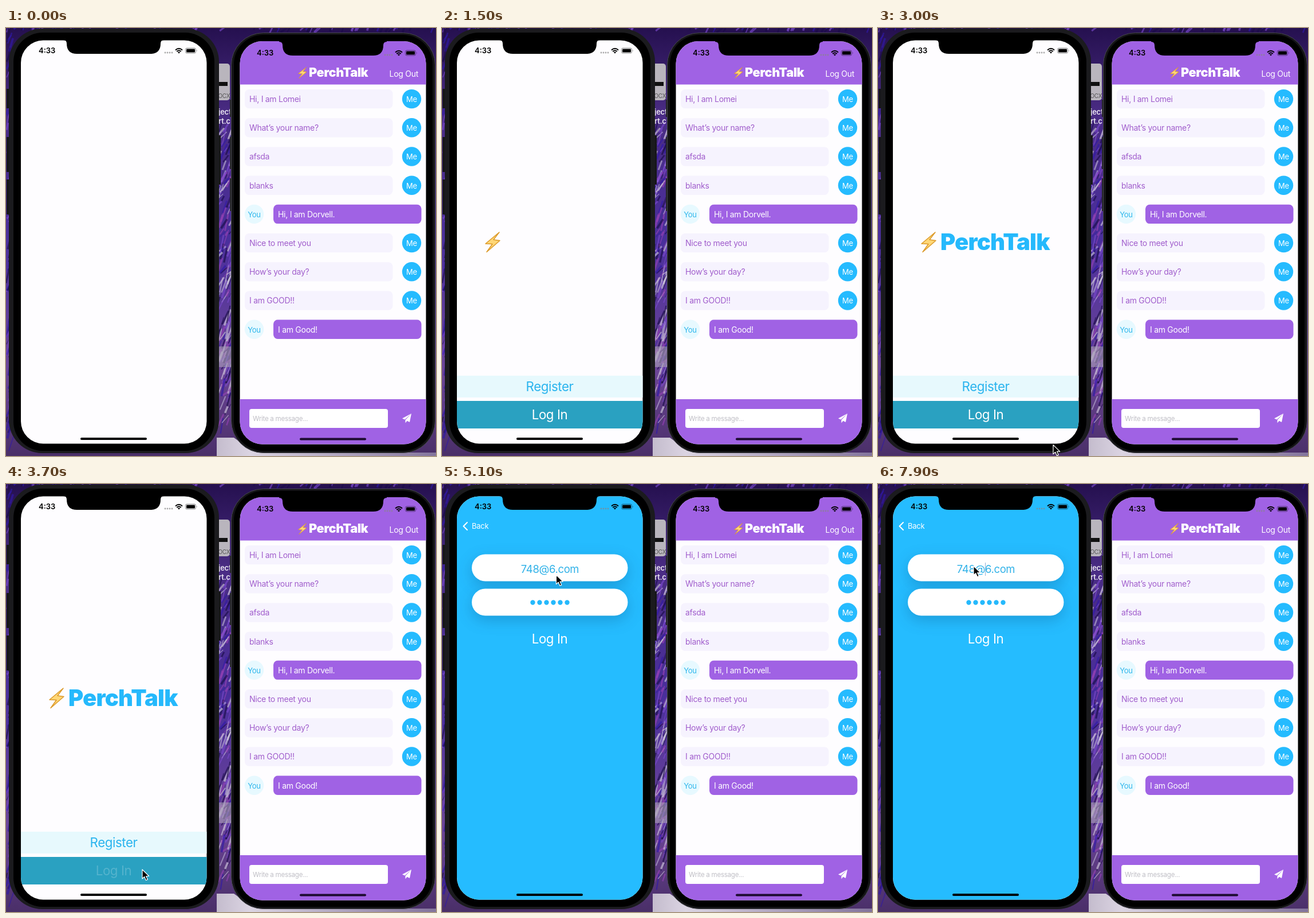
An HTML page for the animation above (8 s loop, 751x746 px).

```html
<!DOCTYPE html>
<html lang="en">
<head>
<meta charset="utf-8">
<title>Chat app login</title>
<style>
  html, body { margin: 0; width: 100%; height: 100%; overflow: hidden; background: #24104f; }
  svg { display: block; width: 751px; height: 746px; }
  text { font-family: Inter, Roboto, "Liberation Sans", sans-serif; letter-spacing: -.02em; white-space: pre; }
  .mid { text-anchor: middle; }
  .time { font-size: 13px; font-weight: 600; letter-spacing: 0; }
  .msg { font-size: 14px; }
  .name { font-weight: 900; }
  .big { font-size: 22.3px; text-anchor: middle; }
  .field { fill: #fff; filter: drop-shadow(0 8px 13px rgba(0, 40, 80, .22)); }
</style>
</head>
<body>
<svg viewBox="0 0 751 746">
  <defs>
    <linearGradient id="wall" x2="0" y2="1">
      <stop offset="0" stop-color="#25104f"/>
      <stop offset=".2" stop-color="#4a2c84"/>
      <stop offset=".5" stop-color="#4a2f9c"/>
      <stop offset=".8" stop-color="#6c4598"/>
      <stop offset="1" stop-color="#4a2f68"/>
    </linearGradient>
    <linearGradient id="glow">
      <stop offset="0" stop-color="#c4bccd"/>
      <stop offset=".15" stop-color="#dbd4e2"/>
      <stop offset="1" stop-color="#83749c"/>
    </linearGradient>
    <clipPath id="leftClip"><rect x="26" y="21.500" width="324.500" height="703" rx="39"/></clipPath>
    <clipPath id="rightClip"><rect x="408.500" y="23" width="325" height="702.500" rx="39"/></clipPath>
    <path id="bolt" d="M100 356L76 376 88 376.500 78 390.500 101 370.500 90 369Z" fill="#ffd777" stroke="#dc9a2a" stroke-width="1.500" stroke-linejoin="round"/>
    <g id="icons">
      <g fill="#888" fill-opacity=".7">
        <circle cx="278" cy="43" r="1.400"/><circle cx="282" cy="43" r="1.400"/>
        <circle cx="286" cy="43" r="1.400"/><circle cx="290" cy="43" r="1.400"/>
      </g>
      <path d="M296 38.500Q302 33 308 38.500M298.300 41Q302 37.500 305.700 41" fill="none" stroke="#000" stroke-width="2"/>
      <path d="M299.800 42.300Q302 40.500 304.200 42.300L302 44.500Z"/>
      <rect x="313.500" y="35" width="18" height="9" rx="2.600" fill="none" stroke="#000" stroke-opacity=".45"/>
      <rect x="315" y="36.500" width="15" height="6" rx="1.300"/>
      <path d="M333 38q1.500 1.500 0 3z" fill-opacity=".5"/>
    </g>
  </defs>

  <rect width="751" height="746" fill="url(#wall)"/>
  <g id="streaks" fill="none"></g>
  <rect x="360" y="62" width="31" height="64" rx="5" fill="#b9b5bd"/>
  <path d="M360 94h27v7h-27z" fill="#111"/>
  <text x="391.500" y="121.500" font-size="10" fill="#555" text-anchor="end">DOCX</text>
  <g font-size="13" font-weight="600" fill="#e9e4f0">
    <text x="371" y="151">ject</text><text x="371" y="167">rt.c</text>
  </g>
  <path d="M366 555h30v36h-30z" fill="#aaa1b8" opacity=".6"/>
  <path d="M368 714h30q30 24 80 26h273v6H368z" fill="url(#glow)"/>

  <!-- left phone -->
  <path d="M1 106h5v34H1zM1 190h5v61H1zM1 264h5v61H1zM370 187h5v86h-5z" fill="#161619"/>
  <rect x="5" y="1" width="367" height="740" rx="58" fill="#1b1b1e"/>
  <rect x="13" y="8" width="351" height="729" rx="51"/>
  <g clip-path="url(#leftClip)">
    <rect x="26" y="21" width="325" height="705" fill="#fefdff"/>
    <g id="home">
      <use href="#bolt"/>
      <text id="brand" class="name" x="109" y="387" font-size="40" fill="#25b9fc"></text>
      <path d="M26 606h325v38H26z" fill="#e7f9fd"/>
      <text class="big" x="188" y="633" fill="#2ab4ee">Register</text>
      <path d="M26 650h325v48H26z" fill="#2aa1c1"/>
      <text id="press" class="big" x="188" y="682" fill="#fff">Log In</text>
    </g>
    <g id="login">
      <rect x="26" y="21" width="325" height="705" fill="#25bcff"/>
      <path d="M44 67l-6.500 6.500 6.500 6.500" fill="none" stroke="#fff" stroke-width="2" stroke-linecap="round" stroke-linejoin="round"/>
      <text x="52" y="78" font-size="13" fill="#fff">Back</text>
      <rect class="field" x="52" y="122.500" width="272.500" height="47" rx="23.500"/>
      <rect class="field" x="52" y="182.500" width="272.500" height="47" rx="23.500"/>
      <text class="mid" x="188.500" y="155" font-size="18.500" fill="#31b2e8">748@6.com</text>
      <path d="M158.500 206.500h61" stroke="#25b9fc" stroke-width="8.400" stroke-linecap="round" stroke-dasharray="0 12"/>
      <text class="big" x="188" y="278" fill="#fff">Log In</text>
      <path id="caret" d="M187.500 137v23" stroke="#8fb2d8"/>
    </g>
  </g>
  <text class="time" x="57" y="44">4:33</text>
  <use href="#icons"/>
  <rect x="130" y="714" width="116" height="4" rx="2"/>

  <!-- right phone -->
  <path d="M391 125h4v30h-4zM391 190h4v56h-4zM391 262h4v57h-4z" fill="#222226"/>
  <rect x="393.500" y="8.500" width="356" height="732" rx="56" fill="#141416" stroke="#47474d"/>
  <rect x="398" y="12" width="347" height="725" rx="51"/>
  <g clip-path="url(#rightClip)">
    <rect x="408" y="23" width="326" height="704" fill="#fefdff"/>
    <path d="M408 23h326v75.500H408zM408 647h326v80H408z" fill="#a062e4"/>
    <use href="#bolt" transform="translate(466 -128) scale(.585 .552)"/>
    <text class="name" x="529" y="85" font-size="21.700" fill="#fff">PerchTalk</text>
    <text class="msg" x="720" y="85" fill="#fff" text-anchor="end">Log Out</text>
    <g id="chat"></g>
    <rect x="425" y="664" width="242" height="33" rx="4" fill="#fff"/>
    <text x="431" y="685" font-size="11.500" fill="#bfbec5">Write a message...</text>
    <path d="M708 672l-16 8.500 4.500 2zM708 672l-10.500 11.300v5.200l3-3.700 4.500 2.200z" fill="#fff"/>
  </g>
  <text class="time" x="438" y="48">4:33</text>
  <use href="#icons" x="384" y="4"/>
  <rect x="513" y="714.500" width="116" height="4" rx="2" fill="#1d0b30"/>
  <g id="notches"></g>

  <path id="cursor" d="M0 0v16l3.700-3.500 2.700 6.200 2.900-1.200-2.700-6h5.100z" stroke="#fff" stroke-width="1.200" stroke-linejoin="round"/>
</svg>
<script>
const $ = id => document.getElementById(id);
const BRAND = 'PerchTalk';

// wallpaper texture, seen only in the gaps around the phones
let seed = 7;
const rnd = () => (seed = seed * 16807 % 2147483647) / 2147483647;
const tints = ['#1a0c48', '#3018a8', '#7a48cc', '#b9aed0', '#cfc6dc', '#9440b4'];
let streaks = '';
for (let i = 0; i < 330; i++) {
  const top = i % 4 == 3, left = i % 4 == 0;
  const x = top ? rnd() * 751 : left ? rnd() * 6 : 364 + rnd() * 26;
  const y = top ? rnd() * 9 : left ? rnd() * 746 : 180 + rnd() * 535;
  const tint = tints[Math.floor(rnd() * (top || left ? 3 : 6))];
  streaks += `<path d="M${x} ${y}l${4 + rnd() * 8} ${-6 - rnd() * 26}" stroke="${tint}" stroke-width="${1 + rnd() * 3}" opacity=".65"/>`;
}
$('streaks').innerHTML = streaks;

const messages = ['Hi, I am Lomei', 'What’s your name?', 'afsda', 'blanks', '>Hi, I am Dorvell.',
  'Nice to meet you', 'How’s your day?', 'I am GOOD!!', '>I am Good!'];
$('chat').innerHTML = messages.map((line, i) => {
  const y = 107 + i * 50.2, other = line[0] == '>';
  const x = other ? 467 : 417, cx = other ? 433.5 : 708.5;
  return `<rect x="${x}" y="${y}" width="258.500" height="33.300" rx="7.500" fill="${other ? '#a062e4' : '#f6f3fe'}"/>
    <text class="msg" x="${x + 8}" y="${y + 22}" fill="${other ? '#fff' : '#a05dcc'}">${line.replace('>', '')}</text>
    <circle cx="${cx}" cy="${y + 16.6}" r="16.700" fill="${other ? '#e7f9ff' : '#25bbff'}"/>
    <text class="mid" x="${cx}" y="${y + 22}" font-size="13" fill="${other ? '#2db6ec' : '#fff'}">${other ? 'You' : 'Me'}</text>`;
}).join('');

const notch = (x, y, w) =>
  `<path d="M${x - 6} ${y - 2}v2q6 0 6 6q0 18 18 18h${w - 36}q18 0 18-18q0-6 6-6v-2z"/>`;
$('notches').innerHTML = notch(106, 21, 164) + notch(483, 24, 176);

const clamp = v => Math.max(0, Math.min(1, v));
const ease = v => v * v * (3 - 2 * v);

// time, x, y
const path = [[2800, 330, 746], [3400, 238, 672], [3800, 238, 672], [4100, 212, 172],
  [4700, 212, 172], [5600, 182, 140], [7000, 182, 140], [7500, 167, 143]];
function cursorAt(t) {
  let [, x, y] = path[0];
  for (let i = 1; i < path.length; i++) {
    const [t0, x0, y0] = path[i - 1], [t1, x1, y1] = path[i];
    if (t < t0) break;
    const k = ease(clamp((t - t0) / (t1 - t0)));
    x = x0 + (x1 - x0) * k;
    y = y0 + (y1 - y0) * k;
  }
  return `translate(${x} ${y})`;
}

const show = (id, on) => $(id).setAttribute('visibility', on ? 'visible' : 'hidden');

function draw() {
  const t = performance.now() % 8000;
  const push = 1 - (1 - clamp((t - 3750) / 330)) ** 3;
  show('home', t >= 1500 && push < 1);
  show('login', push > 0);
  show('caret', t >= 7700);
  show('cursor', t >= 2800);
  $('brand').textContent = BRAND.slice(0, Math.max(0, Math.floor((t - 1500) / 100)));
  $('press').setAttribute('opacity', t >= 3600 ? .2 : 1);
  $('home').setAttribute('transform', `translate(${-97 * push} 0)`);
  $('login').setAttribute('transform', `translate(${325 * (1 - push)} 0)`);
  $('cursor').setAttribute('transform', cursorAt(t));
  requestAnimationFrame(draw);
}
draw();
</script>
</body>
</html>
```
